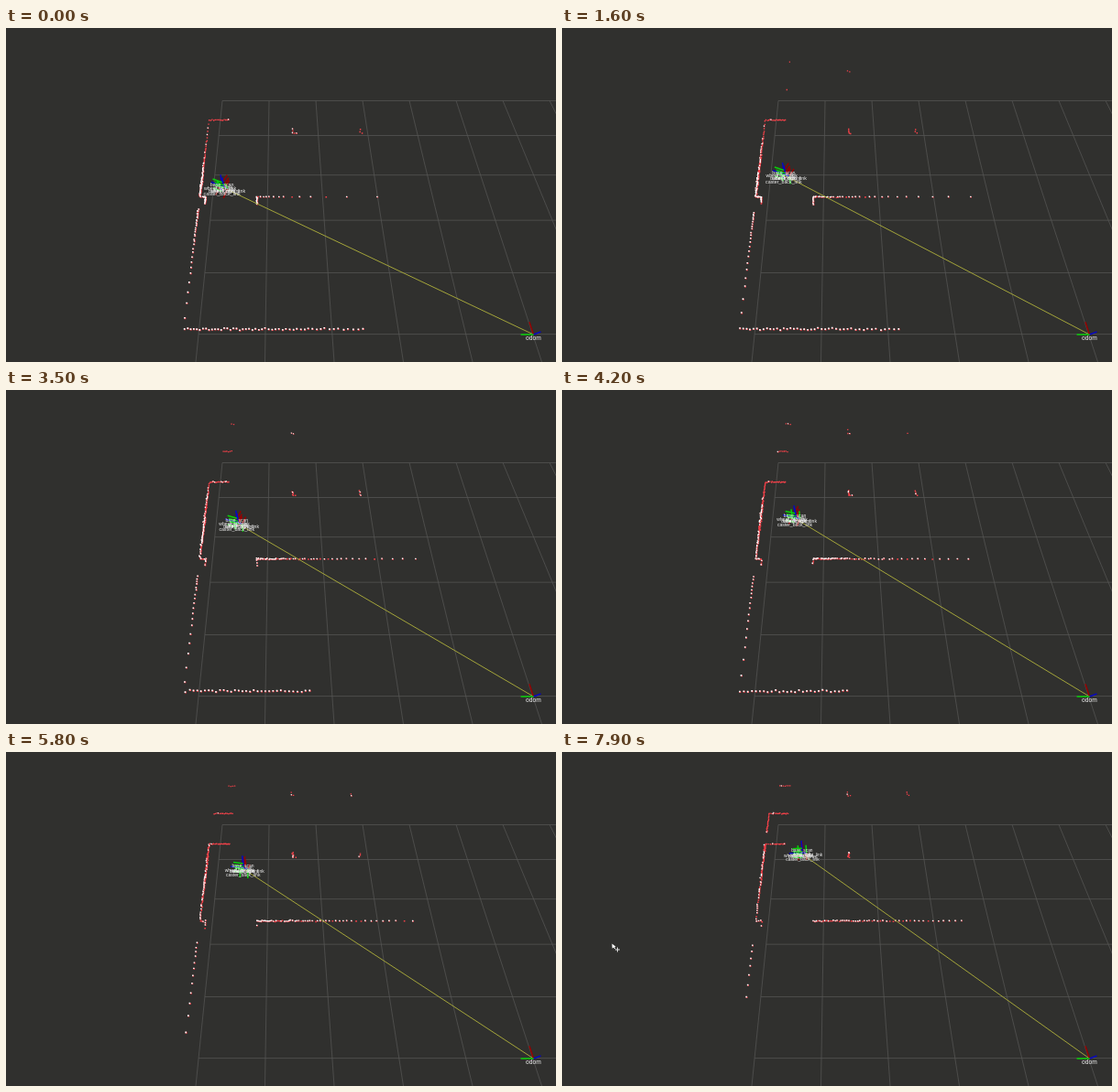
Write an HTML page that moves like this. It is 600 px wide and 365 px high and loops after 8000 ms.

```html
<!DOCTYPE html>
<html lang="en">
<head>
<meta charset="utf-8">
<title>Laser scan view</title>
<style>
  html, body { margin: 0; width: 100%; height: 100%; overflow: hidden; background: #30302e; }
  svg { display: block; width: 600px; height: 365px; }
  text { font-family: "Liberation Sans", Arial, sans-serif; fill: #f4f4f4; text-anchor: middle; }
</style>
</head>
<body>
<svg id="stage" viewBox="0 0 600 365">
  <rect width="600" height="365" fill="#30302e"/>
  <path id="grid" fill="none" stroke="#565654" stroke-width=".75"/>
  <path id="redDots" fill="#f04048"/>
  <path id="whiteDots" fill="#fff"/>
  <path id="link" stroke="#a3a43a" stroke-width="1"/>
  <g fill="none" stroke-width="1.5">
    <path id="axisX" stroke="#960000"/>
    <path id="axisZ" stroke="#0808c0"/>
    <path id="axisY" stroke="#08d008"/>
  </g>
  <g id="labels"></g>
  <g id="cursor" fill="#fff">
    <path d="M54.5 209.5L54.8 214.8L56.2 213.5L57.4 215.3L58.3 214.6L57.2 213L58.8 212.7Z"/>
    <path d="M58 216h5M60.5 213.5v5" stroke="#ddd" stroke-width="1"/>
  </g>
</svg>
<script>
const LOOP = 8000, STEP = 100, RANGE = 3.485, AXIS = 0.19;
const HORIZON = -515, VANISH_X = 296.4, NADIR = [290, 440];
const $ = id => document.getElementById(id);

// Ground coordinates in metres: u to the right, v towards the viewer.
function project(u, v, z = 0) {
  const depth = 1 / (0.001682 - 0.000101 * v);
  const x = VANISH_X + depth * (0.0858 * u - 0.1016), y = depth + HORIZON;
  const dx = x - NADIR[0], dy = y - NADIR[1], k = 45 * z / Math.hypot(dx, dy);
  return [x + dx * k, y + dy * k];
}
function unproject(x, y) {
  const depth = y - HORIZON;
  return [((x - VANISH_X) / depth + 0.1016) / 0.0858, (0.001682 - 1 / depth) / 0.000101];
}
const point = p => p[0].toFixed(2) + " " + p[1].toFixed(2);
const line = (a, b) => `M${point(a)}L${point(b)}`;

// time, x, y, clockwise heading in degrees, wheel turns
const route = [
  [0, 238, 175, 25, -1.45],
  [1600, 244, 161.8, 24, 0],
  [2700, 249.5, 153.3, 22, 1],
  [3500, 253.5, 146.5, 20, 2],
  [4900, 257.5, 135.7, 13, 3],
  [6800, 262, 120, 6, 5],
  [7900, 262.5, 111.8, -2, 5.5]
];
function poseAt(t) {
  let i = 1;
  while (i < route.length - 1 && t > route[i][0]) i++;
  const a = route[i - 1], b = route[i], k = (t - a[0]) / (b[0] - a[0]);
  return a.map((n, j) => n + (b[j] - n) * k).slice(1);
}

// Walls as [u1, v1, u2, v2]
const LEFT = -0.232;
const box = (u1, v1, u2, v2) =>
  [[u1, v1, u2, v1], [u1, v2, u2, v2], [u1, v1, u1, v2], [u2, v1, u2, v2]];
const walls = [
  [LEFT, -1.283, LEFT, 4.925],
  [LEFT, 4.925, 6, 4.925],
  [LEFT, 0.565, 0.19, 0.565],
  [LEFT, -0.358, 0.195, -0.358],
  [LEFT, -1.283, 0.204, -1.283],
  ...box(LEFT, 2.5, -0.123, 2.66),
  ...box(0.811, 2.5, 6, 2.66),
  ...box(1.485, 0.8, 1.57, 0.94),
  ...box(2.85, 0.8, 2.93, 0.94),
  ...box(1.495, -1.09, 1.58, -0.95),
  ...box(2.845, -1.09, 2.93, -0.95)
];
function castRay(u, v, du, dv) {
  let best = Infinity;
  for (const [u1, v1, u2, v2] of walls) {
    const upright = u1 === u2;
    const d = upright ? (u1 - u) / du : (v1 - v) / dv;
    if (!(d > 0.1 && d < best)) continue;
    const at = upright ? v + d * dv : u + d * du;
    if (upright ? at >= v1 && at <= v2 : at >= u1 && at <= u2) best = d;
  }
  return best;
}

function random(seed) {
  const s = Math.sin(seed * 12.9898) * 43758.5453;
  return s - Math.floor(s);
}

const square = (x, y, s) => `M${x.toFixed(2)} ${y.toFixed(2)}h${s}v${s}h-${s}z`;
function drawScan(frame, x, y, heading) {
  const [u, v] = unproject(x, y);
  let red = "", white = "";
  for (let i = 0; i < 360; i++) {
    const a = heading + i * Math.PI / 180, seed = frame * 360 + i + 1;
    const du = Math.sin(a), dv = -Math.cos(a);
    const noise = (random(seed) + random(seed + 0.37) - 1) * 0.022;
    const d = castRay(u, v, du, dv) + noise;
    if (d > RANGE) continue;
    const [px, py] = project(u + du * d, v + dv * d);
    const size = 0.0023 * (py - HORIZON);
    const whiteness = Math.min(1, Math.max(0.12, (py - 85) / 125));
    red += square(px - size / 2 + 0.2, py - size / 2 + 0.2, size.toFixed(2));
    if (random(seed + 0.71) < whiteness)
      white += square(px - size / 2 - 0.1, py - size / 2 - 0.1, (size * 0.85).toFixed(2));
  }
  $("redDots").setAttribute("d", red);
  $("whiteDots").setAttribute("d", white);
}

// name, forward, left, height
const links = [
  ["base_footprint", 0, 0, 0],
  ["base_link", 0, 0, 0.01],
  ["imu_link", 0, 0, 0.07],
  ["wheel_left_link", 0, 0.08, 0.03],
  ["wheel_right_link", 0, -0.08, 0.03],
  ["caster_back_link", -0.08, 0, 0],
  ["base_scan", -0.03, 0, 0.17]
];
function addLabel(name) {
  const el = document.createElementNS("http://www.w3.org/2000/svg", "text");
  el.textContent = name;
  return $("labels").appendChild(el);
}
function placeLabel(el, [x, y]) {
  const size = 0.0078 * (y - HORIZON);
  el.setAttribute("x", x.toFixed(2));
  el.setAttribute("y", (y + size * 0.84).toFixed(2));
  el.setAttribute("font-size", size.toFixed(2));
}
const linkLabels = links.map(l => addLabel(l[0]));
const odom = project(5.01, 5.005);
placeLabel(addLabel("odom"), odom);

function drawFrames(x, y, heading, turns) {
  const [u, v] = unproject(x, y), s = Math.sin(heading), c = Math.cos(heading);
  const place = (f, l, z) => project(u + f * s - l * c, v - f * c - l * s, z);
  const spin = turns * 2 * Math.PI, sp = Math.sin(spin) * AXIS, cp = Math.cos(spin) * AXIS;
  const [ou, ov] = unproject(...odom);
  let ax = line(odom, project(ou, ov - AXIS));
  let ay = line(odom, project(ou - AXIS, ov));
  let az = line(odom, project(ou, ov, AXIS));
  links.forEach(([name, f, l, z], i) => {
    const o = place(f, l, z);
    if (name.startsWith("wheel")) {
      ax += line(o, place(f + cp, l, z + sp));
      ay += line(o, place(f + sp, l, z - cp));
      az += line(o, place(f, l + AXIS, z));
    } else {
      ax += line(o, place(f + AXIS, l, z));
      ay += line(o, place(f, l + AXIS, z));
      az += line(o, place(f, l, z + AXIS));
    }
    placeLabel(linkLabels[i], o);
  });
  $("axisX").setAttribute("d", ax);
  $("axisY").setAttribute("d", ay);
  $("axisZ").setAttribute("d", az);
  $("link").setAttribute("d", line([x, y], odom));
}

function drawGrid() {
  let d = "";
  for (let i = 0; i <= 10; i++) {
    d += line(project(i, 0), project(i, 6));
    if (i < 6) d += line(project(0, i), project(10, i));
  }
  $("grid").setAttribute("d", d);
}

let shown = -1;
function update(now) {
  const frame = Math.floor((now % LOOP) / STEP);
  if (frame !== shown) {
    shown = frame;
    const t = frame * STEP, [x, y, degrees, turns] = poseAt(t);
    const heading = degrees * Math.PI / 180;
    drawScan(frame, x, y, heading);
    drawFrames(x, y, heading, turns);
    $("cursor").setAttribute("visibility", t >= 7600 ? "visible" : "hidden");
  }
}

drawGrid();
const start = performance.now();
function tick() {
  update(performance.now() - start);
  requestAnimationFrame(tick);
}
tick();
</script>
</body>
</html>
```
